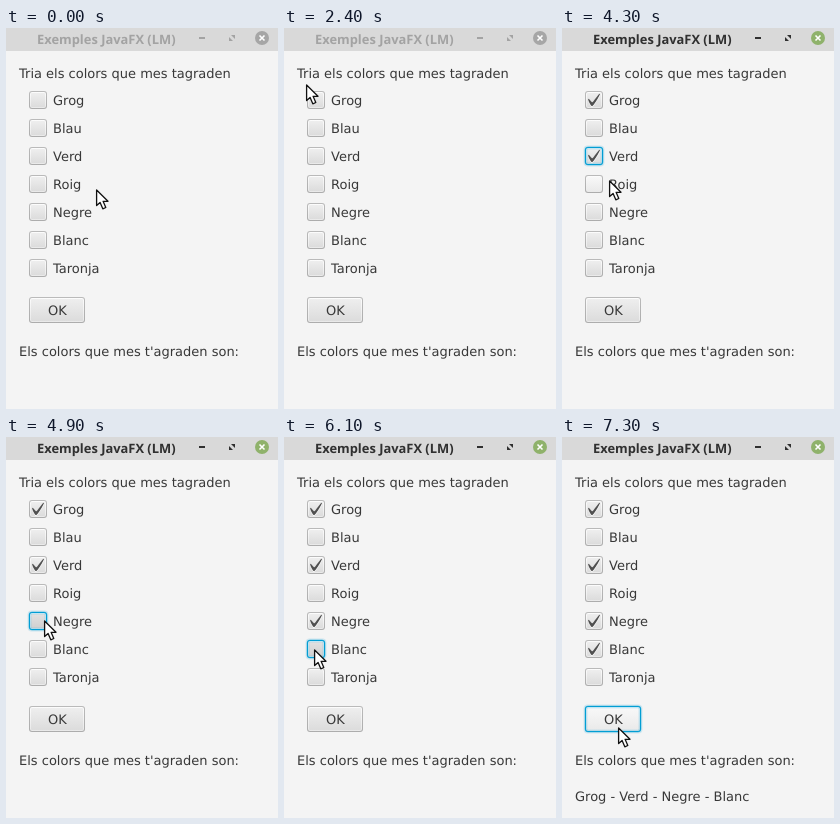
Animation, 272 px wide and 381 px high, one loop 8 s. Source, as an HTML page:

```html
<!DOCTYPE html>
<html lang="ca">
<head>
<meta charset="utf-8">
<title>Tria de colors</title>
<style>
html, body { margin: 0; width: 100%; height: 100%; overflow: hidden; background: #f4f4f4; }
svg { display: block; width: 272px; height: 381px; cursor: default; }
text { font: 13px "DejaVu Sans", sans-serif; fill: #383838; white-space: pre; text-rendering: geometricPrecision; }
.bar { --ink: #a3a3a3; --close: #a6a6a6; }
.bar.active { --ink: #303030; --close: #8fb26b; }
.bar text { font: bold 12.9px "Noto Sans", sans-serif; fill: var(--ink); }
.ink { fill: var(--ink); }
.close { fill: var(--close); }
.outer { fill: url(#edge); }
.inner { fill: url(#rim); }
.body { fill: url(#normal); }
.hover .body { fill: url(#hover); }
.armed .body { fill: url(#armed); }
.glow, .mark { visibility: hidden; }
.glow { fill: #039ed3; fill-opacity: .16; }
.focus .outer { fill: #039ed3; stroke: #039ed3; stroke-width: .4; }
.focus .body { stroke: #039ed3; stroke-opacity: .16; }
.focus .glow, .checked .mark { visibility: visible; }
</style>
</head>
<body>
<svg id="stage" viewBox="0 0 272 381"></svg>
<script>
const LOOP = 8000, STEP = 100, ACTIVATE = 2800, RESULT = 7300;
const colors = ["Grog", "Blau", "Verd", "Roig", "Negre", "Blanc", "Taronja"];
const OK = colors.length;

// time, x, y of the pointer tip
const path = [
  [0, 90, 161], [200, 90, 161], [300, 87, 162], [1500, 87, 162],
  [1700, 104, 167], [1800, 108, 165], [2400, 22, 56], [2500, 29, 69],
  [3000, 29, 69], [3300, 49, 124], [3400, 50, 131], [3700, 31, 128],
  [4100, 31, 128], [4300, 47, 152], [4500, 51, 188], [4700, 39, 183],
  [4800, 39, 183], [4900, 38, 183], [5100, 38, 183], [5400, 20, 226],
  [5800, 30, 212], [6200, 30, 212], [6600, 51, 268], [6800, 56, 290], [LOOP, 56, 290]
];

// press time, control index; the release follows one step later
const clicks = [[2800, 0], [4000, 2], [4900, 4], [6100, 5], [7200, OK]];

const gradient = (id, top, bottom) =>
  `<linearGradient id="${id}" x2="0" y2="1"><stop stop-color="${top}"/><stop offset="1" stop-color="${bottom}"/></linearGradient>`;

const layer = (name, x, y, w, h, inset, radius) =>
  `<rect class="${name}" x="${x + inset}" y="${y + inset}" width="${w - 2 * inset}" height="${h - 2 * inset}" rx="${radius}"/>`;

const box = (x, y, w, h) =>
  layer("outer", x, y, w, h, 0, 3) + layer("inner", x, y, w, h, 1, 2) +
  layer("glow", x, y, w, h, -1.4, 4) + layer("body", x, y, w, h, 2, 1);

const label = (x, y, content, extra = "") => `<text x="${x}" y="${y}" ${extra}>${content}</text>`;

const tick = "M-.25 6.08c.84-.76 4.58 4.83 5.75 4.83S14.5-1.5 15.92-.92c1.29.53-8.75 17.09-10.5 17.09C3 16.17-1.08 6.83-.25 6.08z";

const checkBox = (name, i) => {
  const y = 63 + 28 * i;
  return `<g class="control">${box(23, y, 18, 18)}
    <g class="mark"><path d="${tick}" fill="#fff" transform="translate(26.4 ${y + 4.5}) scale(.72)"/>
    <path d="${tick}" fill="#505050" transform="translate(26.4 ${y + 3.5}) scale(.72)"/></g>
    ${label(47, y + 14, name)}</g>`;
};

const stage = document.getElementById("stage");
stage.innerHTML = `
  <defs>${gradient("edge", "#bababa", "#acacac")}${gradient("rim", "#fcfcfc", "#e9e9e9")}
  ${gradient("normal", "#eeeeee", "#dcdcdc")}${gradient("hover", "#f8f8f8", "#eaeaea")}
  ${gradient("armed", "#e1e1e1", "#d0d0d0")}</defs>
  <rect width="272" height="381" fill="#f4f4f4"/>
  <g class="bar">
    <rect width="272" height="23" fill="#d9d9d9"/>
    ${label(31, 16, "Exemples JavaFX (LM)")}
    <rect class="ink" x="193" y="9" width="6" height="2"/>
    <path class="ink" d="M225 7h4v4zM223 9v4h4z"/>
    <circle class="close" cx="256" cy="10" r="7"/>
    <path d="M253.5 7.5l5 5m0-5l-5 5" stroke="#fff" stroke-width="1.6"/>
  </g>
  ${label(13, 50, "Tria els colors que mes tagraden")}
  ${colors.map(checkBox).join("")}
  <g class="control">${box(23, 269, 56, 26)}${label(51.3, 287, "OK", 'text-anchor="middle"')}</g>
  ${label(13, 328, "Els colors que mes t'agraden son:")}
  ${label(13, 364, "", 'id="result"')}
  <path id="pointer" d="M.6 1V16.6L4.1 13.4L6.8 19.8L9.8 18.5L7.1 12.3H12Z"
    fill="#fff" stroke="#111" stroke-width="1.3" stroke-linejoin="round"/>`;

const bar = stage.querySelector(".bar");
const result = stage.querySelector("#result");
const pointer = stage.querySelector("#pointer");
const controls = [...stage.querySelectorAll(".control")];

const areas = controls.map((control, i) => {
  if (i === OK) return { left: 23, right: 79, top: 268, bottom: 295 };
  const text = control.querySelector("text").getBBox();
  const top = 63 + 28 * i;
  return { left: 23, right: text.x + text.width, top, bottom: top + 18 };
});

function pointerAt(time) {
  const next = Math.max(1, path.findIndex(point => point[0] >= time));
  const [t0, x0, y0] = path[next - 1], [t1, x1, y1] = path[next];
  const k = (time - t0) / (t1 - t0);
  return [Math.round(x0 + (x1 - x0) * k), Math.round(y0 + (y1 - y0) * k)];
}

function draw(time) {
  const [x, y] = pointerAt(time);
  const done = clicks.filter(([press]) => time >= press);
  const last = done[done.length - 1];
  const chosen = done.filter(([press]) => time >= press + STEP).map(click => click[1]);

  pointer.setAttribute("transform", `translate(${x} ${y})`);
  bar.classList.toggle("active", time >= ACTIVATE);
  controls.forEach((control, i) => {
    const a = areas[i], focused = Boolean(last) && last[1] === i;
    control.classList.toggle("hover", x >= a.left && x <= a.right && y >= a.top && y < a.bottom);
    control.classList.toggle("focus", focused);
    control.classList.toggle("armed", focused && time < last[0] + STEP);
    control.classList.toggle("checked", i !== OK && chosen.includes(i));
  });
  result.textContent = time >= RESULT ? colors.filter((_, i) => chosen.includes(i)).join(" - ") : "";
}

const start = performance.now();
let shown = -1;
function frame() {
  const elapsed = (performance.now() - start) % LOOP;
  const time = Math.floor(elapsed / STEP) * STEP;
  if (time !== shown) draw(shown = time);
  requestAnimationFrame(frame);
}
frame();
</script>
</body>
</html>
```
